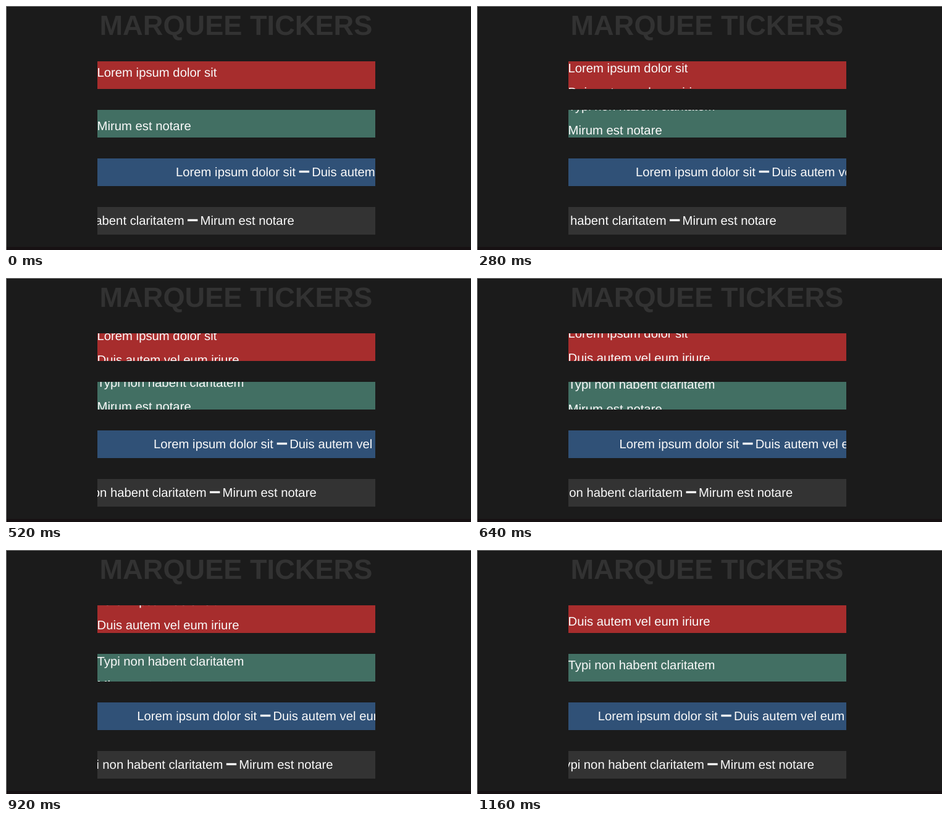
An HTML page that plays this animation: 753 px wide and 397 px high, repeating every 1260 ms.

```html
<!DOCTYPE html>
<html lang="en">
<head>
<meta charset="utf-8">
<title>Marquee tickers</title>
<style>
  html, body { margin: 0; width: 100%; height: 100%; overflow: hidden; background: #1b1b1b; }
  svg { display: block; }
  text {
    font: 20.3px "Liberation Sans", Arial, sans-serif;
    fill: #fafafa;
    text-rendering: geometricPrecision;
  }
  .title { font-size: 45.2px; font-weight: bold; fill: #323232; }
</style>
</head>
<body>
<svg id="stage" width="753" height="397" viewBox="0 0 753 397">
  <rect width="753" height="397" fill="#1b1b1b"/>
  <rect y="392" width="753" height="5" fill="#171113"/>
  <rect width="753" height="1" fill="#808080"/>
  <rect width="1" height="397" fill="#808080"/>
  <text class="title" x="372.4" y="47" text-anchor="middle">MARQUEE TICKERS</text>
</svg>
<script>
const LOOP = 1260;
// [start in ms, horizontal travel in px]
const STEPS = [
  [0, 0], [150, 9], [280, 18], [400, 27], [520, 36],
  [640, 44.5], [790, 54.8], [920, 62.8], [1040, 71], [1160, 79.3]
];
const RISE = 0.4;          // vertical travel per horizontal pixel
const LINE = 39.5;         // distance between stacked lines
const BAR = { x: 148, width: 450, height: 45 };

const LOREM = "Lorem ipsum dolor sit";
const DUIS = "Duis autem vel eum iriure";
const TYPI = "Typi non habent claritatem";
const MIRUM = "Mirum est notare";

// Item positions are relative to the bar's top left corner.
const TICKERS = [
  { y: 90, color: "#a72d2d", dir: [0, -RISE],
    items: [[LOREM, -0.5, 25], [DUIS, -0.5, 25 + LINE]] },
  { y: 169, color: "#426f63", dir: [0, RISE],
    items: [[MIRUM, -0.5, 33], [TYPI, -0.5, 33 - LINE]] },
  { y: 248, color: "#305177", dir: [-1, 0], dash: 326.7,
    items: [[LOREM, 127, 29], [DUIS, 347.2, 29]] },
  { y: 327, color: "#333333", dir: [1, 0], dash: 146,
    items: [[TYPI, -97.3, 29], [MIRUM, 166.5, 29]] }
];

function add(parent, tag, attrs, content) {
  const el = document.createElementNS("http://www.w3.org/2000/svg", tag);
  for (const key in attrs) el.setAttribute(key, attrs[key]);
  if (content) el.textContent = content;
  return parent.appendChild(el);
}

const stage = document.getElementById("stage");
for (const t of TICKERS) {
  const bar = add(stage, "svg", { ...BAR, y: t.y, overflow: "hidden" });
  add(bar, "rect", { width: BAR.width, height: BAR.height, fill: t.color });
  t.group = add(bar, "g");
  for (const [words, x, y] of t.items) add(t.group, "text", { x, y }, words);
  if (t.dash) add(t.group, "rect", { x: t.dash, y: 19.8, width: 16.4, height: 3.4, fill: "#fafafa" });
}

function draw(now) {
  const time = now % LOOP;
  const travel = STEPS.findLast(([start]) => start <= time)[1];
  for (const { group, dir: [dx, dy] } of TICKERS) {
    group.setAttribute("transform", `translate(${dx * travel} ${dy * travel})`);
  }
}

const begin = performance.now();
function tick() {
  draw(performance.now() - begin);
  requestAnimationFrame(tick);
}
tick();
</script>
</body>
</html>
```
